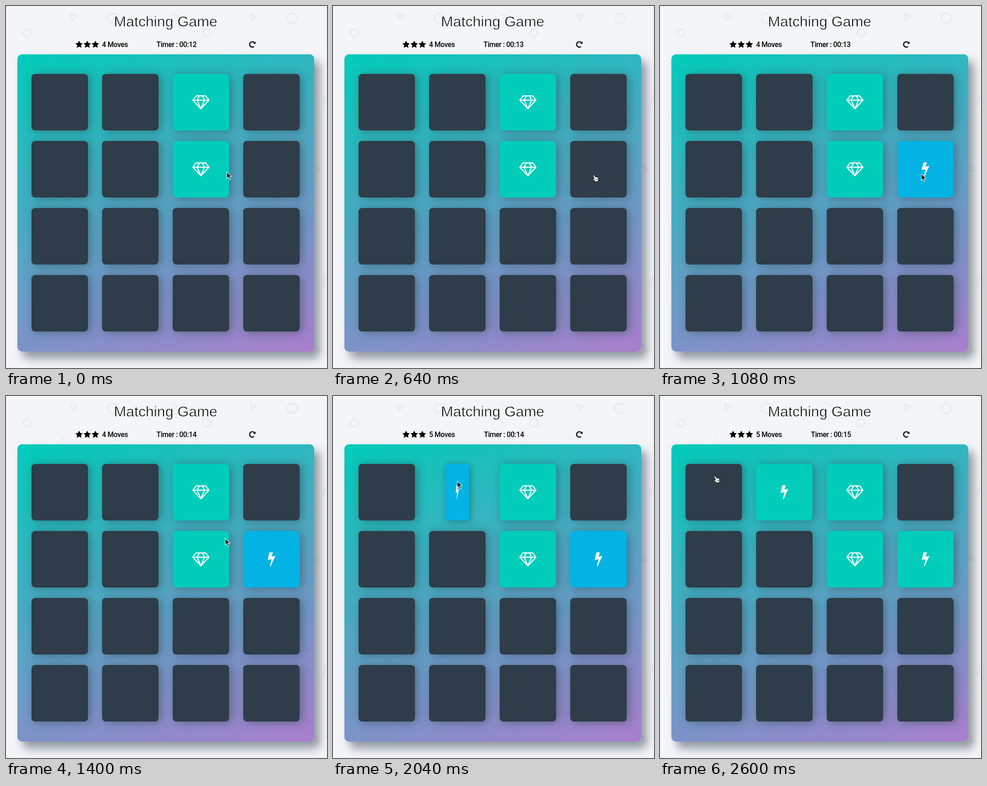
These frames come from a looping animation (705 px wide and 794 px high, 2.64 s). An HTML page:

```html
<!DOCTYPE html>
<html lang="en">
<head>
<meta charset="utf-8">
<title>Matching Game</title>
<style>
html, body { margin: 0; width: 100%; height: 100%; overflow: hidden; background: #f4f5f8; }
#stage { position: absolute; left: 0; top: 0; width: 705px; height: 794px; overflow: hidden; }
#stage > svg { position: absolute; left: 0; top: 0; }
#deck {
  position: absolute; left: 25px; top: 106px; width: 652px; height: 652px; border-radius: 10px;
  background: linear-gradient(160deg, #02ccba 0%, #aa7ecd 100%);
  box-shadow: 12px 15px 20px 0 rgba(46, 61, 73, .5);
}
.card {
  position: absolute; width: 124px; height: 123.5px; border-radius: 8px; background: #2e3d49;
  box-shadow: 5px 2px 20px 0 rgba(46, 61, 73, .5);
}
.card svg { display: block; width: 100%; height: 100%; fill: #fff; fill-rule: evenodd; }
.stat { font: 500 15.6px Roboto, sans-serif; letter-spacing: -.35px; }
</style>
</head>
<body>
<div id="stage">
  <svg width="705" height="794" viewBox="0 0 705 794">
    <defs>
      <pattern id="shapes" width="395" height="395" patternUnits="userSpaceOnUse">
        <g fill="none" stroke="#e9eaed" stroke-width="3">
          <path d="M142 17L155 22L145 31Z"/>
          <circle cx="234" cy="27" r="11"/>
          <path d="M363 14L382 25"/>
          <path d="M37 59L41.500 51H51L55.500 59L51 67H41.500Z"/>
          <path d="M308 197L301 220"/>
          <path d="M287 349L297 362L285 363Z"/>
        </g>
        <g fill="#e9eaed">
          <circle cx="124" cy="92" r="2.500"/>
          <circle cx="315" cy="51" r="2.500"/>
        </g>
      </pattern>
    </defs>
    <rect width="705" height="794" fill="url(#shapes)"/>
    <text x="237" y="45" font-family="Liberation Sans, Arial, sans-serif" font-size="32.200"
      stroke="#f4f5f8" stroke-width=".8">Matching Game</text>
    <g id="stars" stroke="#000" stroke-width="1" stroke-linejoin="round"></g>
    <text id="moves" class="stat" x="211" y="90"></text>
    <text id="timer" class="stat" y="90"></text>
    <g transform="translate(541 84.300)">
      <path d="M4.200 -4.200A5.950 5.950 0 1 0 3.800 4.600" fill="none" stroke="#000" stroke-width="2.400"/>
      <path d="M7.100 -6.600V-1.200H1.700Z"/>
    </g>
  </svg>
  <div id="deck"></div>
  <svg width="705" height="794" style="z-index:2">
    <g id="cursor">
      <path id="arrow" stroke="#fff" stroke-width="1.100"
        d="M0 0V14.200L3.300 11.200L5.700 16.700L8.200 15.600L5.800 10.200H10.200Z"/>
      <g id="hand" stroke="#000" stroke-width="1" stroke-linejoin="round">
        <path fill="#fff" d="M-2.800 4.800Q-3.200 3 -1.800 2.600Q-.600 2.300 .200 3.800L1.800 7Q3 6.200 4 7.200Q5.400 6.400 6.200 7.600Q8 7 8.400 8.800L9.200 12L8.600 14.400L8.800 16.600L2.600 17.400Q1.400 15.400 -1 14.400Q-4 12.600 -3.600 11.400Q-2.600 10.400 0 11.800Z"/>
        <path fill="none" stroke-width=".7" d="M2.800 11.300L3.500 14.300M4.800 11L5.400 14M6.700 10.700L7.200 13.700"/>
      </g>
    </g>
  </svg>
</div>
<script>
const LOOP = 2640, FLIP = 500;
const $ = id => document.getElementById(id);

const ICONS = {
  gem: { cx: 1024, d: 'M212 768l623 665-300-665zM1024 1561l349-793h-698zM538 640l204-384h-262l-288 384zM1213 1433l623-665h-323zM683 640h682l-204-384h-274zM1510 640h346l-288-384h-262zM1651 154l384 512q14 18 13 41t-17 41l-960 1024q-18 20-47 20t-47-20l-960-1024q-16-17-17-41t13-41l384-512q18-26 51-26h1152q33 0 51 26z' },
  bolt: { cx: 448, d: 'M885 566q18 20 7 44l-540 1157q-13 25-42 25-50-5-44-51l197-808-406 101q-60 0-56-49l201-825q10-32 44-32h328q45 5 45 42 0 8-5 18l-171 463 396-98q30-5 46 13z' }
};

// Cards that are open or will be opened
const FACES = {
  2: { icon: 'gem', match: -1 },
  6: { icon: 'gem', match: -1 },
  7: { icon: 'bolt', open: 685, match: 2390 },
  1: { icon: 'bolt', open: 1855, match: 2390 }
};

const MOVES = [
  { from: 40, to: 520, a: [485, 364], b: [574, 368] },
  { from: 1180, to: 1700, a: [574, 368], b: [273, 187] },
  { from: 2285, to: 2585, a: [273, 187], b: [122, 173] }
];

const clamp = v => Math.max(0, Math.min(1, v));
const glide = v => v < .5 ? 4 * v ** 3 : 1 - 4 * (1 - v) ** 3;

// CSS "ease": cubic-bezier(.25, .1, .25, 1)
function ease(x) {
  let lo = 0, hi = 1;
  const bez = (a, b, s) => 3 * a * s * (1 - s) ** 2 + 3 * b * s * s * (1 - s) + s ** 3;
  for (let i = 0; i < 24; i++) {
    const mid = (lo + hi) / 2;
    if (bez(.25, .25, mid) < x) lo = mid; else hi = mid;
  }
  return bez(.1, 1, lo);
}

const cards = Array.from({ length: 16 }, (_, i) => {
  const el = document.createElement('div');
  const x = 56 + i % 4 * 155, y = 149 + Math.floor(i / 4) * 147.1;
  el.className = 'card';
  el.style.left = x + 'px';
  el.style.top = y + 'px';
  const face = FACES[i];
  if (face) {
    const { cx, d } = ICONS[face.icon];
    el.innerHTML = `<svg viewBox="0 0 124 123.5"><path transform="translate(62 62.3) scale(.0184) translate(${-cx} -960)" d="${d}"/></svg>`;
  }
  $('stage').append(el);
  return { el, x, y, face };
});

function star(cx, cy) {
  const pts = Array.from({ length: 10 }, (_, i) => {
    const r = i % 2 ? 3.8 : 7.8, a = i * Math.PI / 5;
    return `${cx + r * Math.sin(a)},${cy - r * Math.cos(a)}`;
  });
  return `<polygon points="${pts.join(' ')}"/>`;
}
$('stars').innerHTML = [160.5, 178.4, 196.2].map(x => star(x, 84.7)).join('');

function drawCard({ el, face }, t) {
  if (!face) return;
  const start = face.open ?? -FLIP;
  const open = t >= start;
  el.style.background = t >= face.match ? '#02ccba' : open ? '#02b3e4' : '#2e3d49';
  el.firstChild.style.visibility = open ? 'visible' : 'hidden';
  const turn = open ? ease(clamp((t - start) / FLIP)) : 1;
  el.style.transform = `scaleX(${-Math.cos(Math.PI * turn)})`;
}

function drawCursor(t) {
  let [x, y] = MOVES[0].a;
  for (const { from, to, a, b } of MOVES) {
    if (t < from) break;
    const p = glide(clamp((t - from) / (to - from)));
    x = a[0] + (b[0] - a[0]) * p;
    y = a[1] + (b[1] - a[1]) * p;
  }
  const over = cards.find(c => x >= c.x && x <= c.x + 124 && y >= c.y && y <= c.y + 123.5);
  const closed = over && (!over.face || t < (over.face.open ?? -1));
  $('cursor').setAttribute('transform', `translate(${x} ${y})`);
  $('hand').style.display = closed ? '' : 'none';
  $('arrow').style.display = closed ? 'none' : '';
}

function draw(t) {
  const fifth = t >= FACES[1].open;
  const sec = 12 + [110, 1110, 2110].filter(s => t >= s).length;
  $('moves').textContent = (fifth ? 5 : 4) + ' Moves';
  $('timer').textContent = 'Timer : 00:' + sec;
  $('timer').setAttribute('x', fifth ? 331.6 : 330.6);
  cards.forEach(c => drawCard(c, t));
  drawCursor(t);
}

function tick() {
  draw(performance.now() % LOOP);
  requestAnimationFrame(tick);
}
tick();
</script>
</body>
</html>
```
